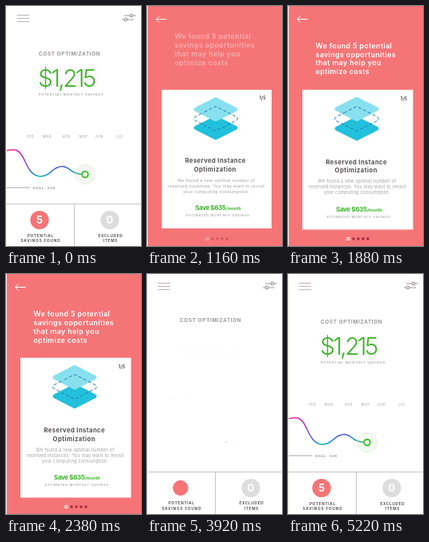
An HTML page with a canvas that plays this animation: 169x300 px, repeating every 5.32 s.

```html
<!DOCTYPE html>
<html lang="en">
<head>
<meta charset="utf-8">
<style>
  html, body { margin: 0; width: 100%; height: 100%; overflow: hidden; background: #fff; }
  canvas { display: block; width: 169px; height: 300px; }
</style>
</head>
<body>
<canvas id="stage"></canvas>
<script>
const LOOP = 5320, W = 169, H = 300;
const RED = '#f57577', GREEN = '#3fb22b', GREY = '#9b9698';
const canvas = document.getElementById('stage');
const c = canvas.getContext('2d');
const dpr = window.devicePixelRatio || 1;
canvas.width = W * dpr;
canvas.height = H * dpr;

const ramp = (t, a, b) => Math.min(1, Math.max(0, (t - a) / (b - a)));
const mix = (a, b, p) => a + (b - a) * p;
const easeOut = p => 1 - (1 - p) ** 3;
const easeIn = p => p * p;

function layer(alpha, draw) {
  if (alpha <= 0) return;
  c.save();
  c.globalAlpha *= alpha;
  draw();
  c.restore();
}

function text(str, x, y, size, weight, color, spacing = 0, align = 'left') {
  c.font = `${weight} ${size}px Inter, "Open Sans", sans-serif`;
  c.letterSpacing = spacing + 'px';
  c.textBaseline = 'alphabetic';
  c.textAlign = 'left';
  c.fillStyle = color;
  const width = c.measureText(str).width - spacing;
  c.fillText(str, align === 'center' ? x - width / 2 : x, y);
  return width;
}
const centered = (str, x, y, size, weight, color, spacing) =>
  text(str, x, y, size, weight, color, spacing, 'center');

function line(color, width, ...p) {
  c.strokeStyle = color;
  c.lineWidth = width;
  c.beginPath();
  for (let i = 0; i < p.length; i += 2) c.lineTo(p[i], p[i + 1]);
  c.stroke();
}

function disc(x, y, r, fill, stroke, width = 1) {
  c.beginPath();
  c.arc(x, y, Math.max(0, r), 0, 7);
  if (fill) { c.fillStyle = fill; c.fill(); }
  if (stroke) { c.strokeStyle = stroke; c.lineWidth = width; c.stroke(); }
}

function icons() {
  for (const y of [11.5, 15.5, 19.5]) line('#c0b6b8', 1.1, 13.5, y, 29, y);
  line('#a39b9d', 1, 148, 12, 163, 12);
  line('#a39b9d', 1, 145, 17, 160, 17);
  disc(157, 12, 1.9, '#fff', '#8d8587');
  disc(150, 17, 1.9, '#fff', '#8d8587');
}

function chart(drawn) {
  c.save();
  c.beginPath();
  c.rect(0, 170, 99 * drawn, 60);
  c.clip();
  const hue = c.createLinearGradient(0, 0, 99, 0);
  [[0, '#f5279b'], [.15, '#e32aa6'], [.24, '#8d3fd0'], [.33, '#2f6fe0'], [.41, '#1fb6a5'],
   [.52, '#2a9fd8'], [.64, '#4a53dc'], [.73, '#4d52da'], [.83, '#2398cf'], [1, '#3fc23a']]
    .forEach(([at, color]) => hue.addColorStop(at, color));
  c.strokeStyle = hue;
  c.lineWidth = 1.5;
  c.beginPath();
  c.moveTo(0, 181);
  c.bezierCurveTo(4, 180, 8, 179, 12, 180);
  c.bezierCurveTo(25, 183, 24, 212, 43, 213);
  c.bezierCurveTo(56, 213, 58, 200.5, 70, 200.5);
  c.bezierCurveTo(81, 200.5, 79, 210.5, 99, 210.5);
  c.stroke();
  c.restore();
}

function dashboard(t) {
  // The content is complete until the overlay has closed, then it builds up again.
  const s = t < 3480 ? LOOP : t;
  c.fillStyle = '#fff';
  c.fillRect(0, 0, W, H);
  icons();

  const drop = easeOut(ramp(s, 3760, 4200));
  layer(ramp(s, 3640, 3860), () =>
    text('COST OPTIMIZATION', 41, mix(55, 61.8, drop), 6.4, 600, '#918b8d', .65));
  layer(ramp(s, 3890, 4350), () =>
    text('POTENTIAL MONTHLY SAVINGS', 41, mix(95, 112, easeOut(ramp(s, 3880, 4350))), 4, 500, GREY, .75));

  const count = easeOut(ramp(s, 4000, 4760));
  layer(ramp(s, 4000, 4350), () =>
    text('$' + Math.round(1215 * count).toLocaleString('en-US'),
      40, mix(92, 101, easeOut(ramp(s, 4000, 4450))), 30, 300, GREEN, -2.7));

  const months = { FEB: 30.5, MAR: 51, APR: 75.5, MAY: 97, JUN: 116, JUL: 142.5 };
  Object.entries(months).forEach(([name, x], i) => {
    const start = 3860 + i * 25;
    layer(ramp(s, start, start + 560), () =>
      centered(name, x, mix(154.5, 164.7, easeOut(ramp(s, start, start + 600))), 4.2, 500, '#b4b1b3', .5));
  });

  chart(easeOut(ramp(s, 4300, 4860)));
  const reach = ramp(s, 4550, 4950);
  if (reach) line('#a9a3ad', 1, 0, 227, 30 * reach, 227);
  layer(ramp(s, 4800, 5180), () => text('GOAL: 24K', 33.5, 229.4, 4.1, 600, '#8e8896', .75));

  const pulse = Math.sin(Math.PI * ramp(t, 20, 540));
  const halo = easeOut(ramp(s, 4550, 5180));
  if (halo) disc(99, 210.5, 12 * halo + pulse, 'rgba(63,178,43,.06)', '#dfe6df', .8);
  const dot = ramp(s, 3900, 4800);
  if (dot) disc(99, 210.5, .4 + 3.4 * easeIn(dot), '#fff', '#45c32d', .5 + 1.5 * dot);

  line('#c9c7c8', 1, 0, 247.5, W, 247.5);
  line('#c9c7c8', 1, 85.5, 247.5, 85.5, H);
  const press = Math.sin(Math.PI * ramp(t, 320, 560));
  disc(42, 267.5, mix(9.6, 11.6, ramp(s, 3900, 4300)) - press, RED);
  layer(ramp(s, 4250, 4600), () => centered('5', 42, 272.3, 13, 700, '#fff'));
  disc(130, 267.5, 11.6, '#dddddd');
  centered('0', 130, 272.3, 13, 700, '#fff');
  const y = mix(288.1, 288.6, drop), ink = '#575355';
  centered('POTENTIAL', 43, y, 4.7, 700, ink, .7);
  centered('SAVINGS FOUND', 43, 294.8, 4.7, 700, ink, .85);
  centered('EXCLUDED', 130.5, y, 4.7, 700, ink, .7);
  centered('ITEMS', 130.5, 294.8, 4.7, 700, ink, .75);
}

function sheet(y) {
  const x = 86, w = 30.5, h = 15.5, r = 2.5;
  c.beginPath();
  c.moveTo(x - w / 2, y - h / 2);
  c.arcTo(x, y - h, x + w, y, r);
  c.arcTo(x + w, y, x, y + h, r);
  c.arcTo(x, y + h, x - w, y, r);
  c.arcTo(x - w, y, x, y - h, r);
  c.closePath();
}

function layersIcon(t) {
  const bob = Math.sin(t / 380) * .5;
  c.fillStyle = '#22c0db';
  sheet(152.7 - bob);
  c.fill();
  c.fillStyle = '#88e0ee';
  sheet(129.3 + bob);
  c.fill();
  c.save();
  c.setLineDash([4, 2.6]);
  c.lineDashOffset = -t / 150;
  c.strokeStyle = '#2474b4';
  c.lineWidth = 1;
  sheet(141);
  c.stroke();
  c.restore();
}

function card(t) {
  const open = easeOut(ramp(t, 660, 1300));
  const close = easeIn(ramp(t, 3500, 3800));
  const p = open * (1 - close);
  layer(ramp(t, 660, 830) * (1 - close), () => {
    c.translate(87.2, mix(127, 192, p));
    c.scale(mix(.27, 1, p), mix(.17, 1, p));
    c.translate(-87.2, -192);
    const tilt = 8 * (1 - p);
    c.fillStyle = '#fff';
    c.beginPath();
    c.moveTo(18, 104.7);
    c.lineTo(156.5, 104.7);
    c.lineTo(156.5 - tilt, 279.4);
    c.lineTo(18 + tilt, 279.4);
    c.fill();

    layersIcon(t);
    text('1/5', 140.8, 117.5, 5.6, 700, '#555053', .2);
    c.translate(0, mix(-1, 0, ramp(t, 1450, 2100)));
    centered('Reserved Instance', 85.5, 198, 7.7, 700, '#555053', .4);
    centered('Optimization', 85, 208.5, 7.7, 700, '#555053', .45);
    const body = ['We found a new optimal number of',
      'reserved instances. You may want to revisit', 'your computing consumption.'];
    body.forEach((row, i) => centered(row, 86.5, 221.5 + i * 7.1, 5.5, 400, '#a5a0a3', .22));
    const w = text('Save $635', 60, 257, 8.1, 700, GREEN, -.4);
    text('/month', 60 + w, 257, 5.4, 700, GREEN);
    centered('ESTIMATED MONTHLY SAVINGS', 88.5, 265.3, 4, 500, '#a39c9e', .7);
  });
}

function savings(t) {
  const grow = easeIn(ramp(t, 560, 811));
  const shrink = easeOut(ramp(t, 3500, 3880));
  const r = t < 3500 ? mix(11.6, 304, grow) : mix(304, 9.6, shrink);
  c.save();
  c.beginPath();
  c.arc(42, 267.5, r, 0, 7);
  c.clip();
  c.fillStyle = RED;
  c.fillRect(0, 0, W, H);
  const leave = 1 - ramp(t, 3500, 3660);

  layer(ramp(t, 900, 1200) * (1 - ramp(t, 3200, 3420)), () => {
    line('#fff', 1, 11.5, 16.5, 24.5, 16.5);
    line('#fff', 1, 15.5, 12.5, 11.5, 16.5, 15.5, 20.5);
  });
  const tap = easeOut(ramp(t, 3220, 3480));
  layer(.7 * tap * leave, () => disc(20, 25.5, 10 * tap, null, '#fff', .9));

  layer(ramp(t, 1000, 1400) * leave, () => {
    const rise = 15 * (1 - ramp(t, 1050, 2100)) ** 2;
    const rows = ['We found 5 potential', 'savings opportunities', 'that may help you', 'optimize costs'];
    rows.forEach((row, i) => text(row, 34.5, 53.3 - rise + i * 10.9, 8.8, 600, '#fff', .4));
    c.fillStyle = '#a5283b';
    for (let i = 1; i < 5; i++) c.fillRect(74.5 + i * 6, 289.5, 3, 3);
    c.strokeStyle = '#fff';
    c.lineWidth = 1;
    c.strokeRect(74, 289.5, 3, 3);
  });
  card(t);
  c.restore();
}

function frame(now) {
  const t = now % LOOP;
  c.setTransform(dpr, 0, 0, dpr, 0, 0);
  dashboard(t);
  if (t >= 560 && t < 3880) savings(t);
  c.fillStyle = '#f4f1ea';
  c.fillRect(0, 0, 1, H);
}

const start = performance.now();
function tick() {
  frame(performance.now() - start);
  requestAnimationFrame(tick);
}
tick();
</script>
</body>
</html>
```
